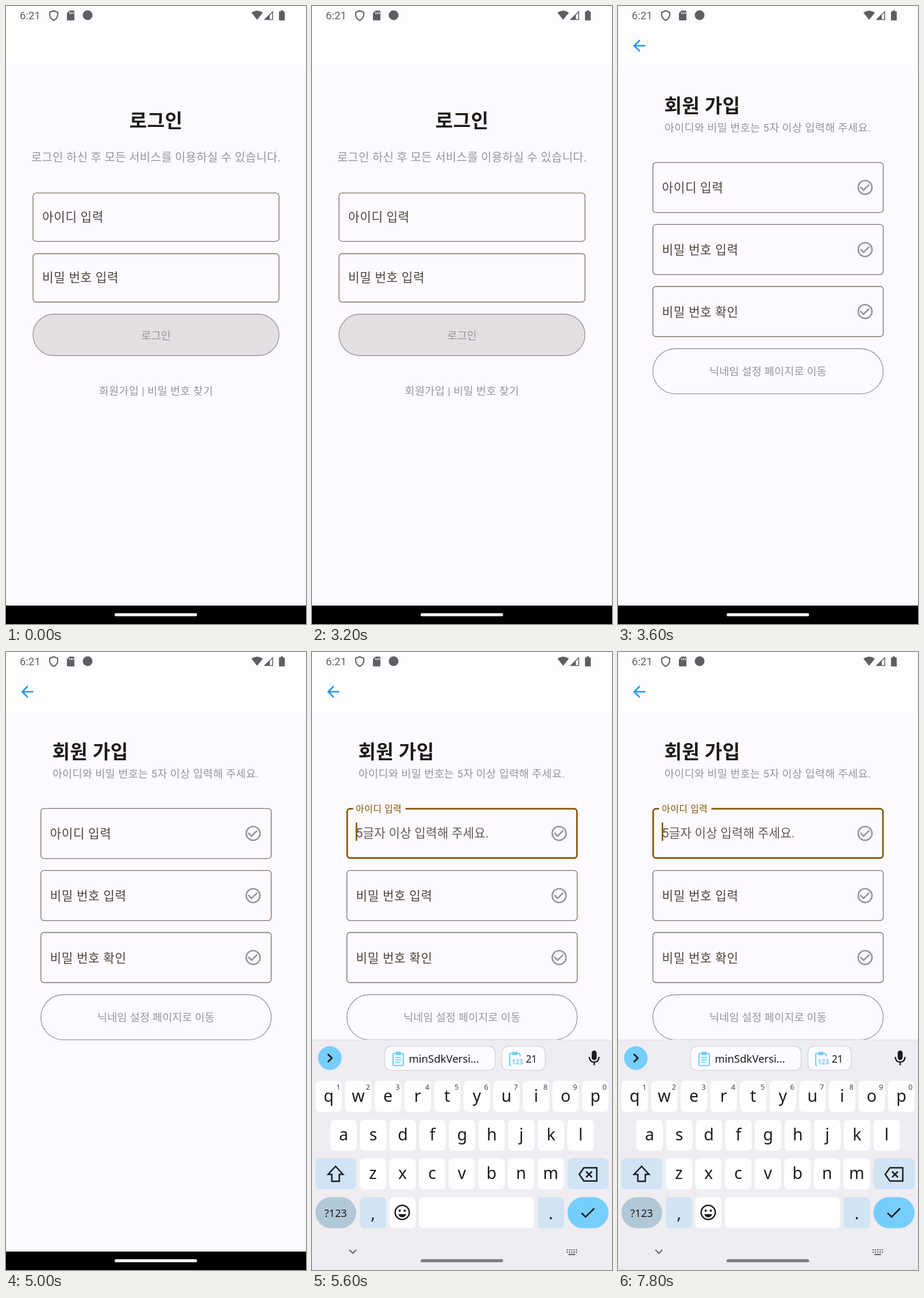
Recreate the animation shown at these times as an HTML page. Size 522x1073 px, loop 8000 ms.

```html
<!DOCTYPE html>
<html lang="ko">
<meta charset="utf-8">
<style>
  html, body { margin: 0; height: 100%; overflow: hidden; background: #fcfaff; }
  svg { display: block; width: 522px; height: 1073px; }
  text { font-family: Roboto, "Noto Sans CJK KR", "Noto Sans CJK JP", sans-serif; white-space: pre; }
  .key { font-family: "Noto Sans", sans-serif; }
</style>
<svg id="stage" viewBox="0 0 522 1073"></svg>
<script>
const INK = '#1e1b16', GRAY = '#989599', LABEL = '#4c4239', LINE = '#7c7168', BROWN = '#835100';
const STATUS = '#5f5e63', SKY = '#76ceff', PALE = '#d0e4f3', WHITE = '#fefdff';
const LOOP = 8000, STEP = 200, SIGNUP_AT = 3600, FOCUS_AT = 5400;

const text = (s, x, y, size, fill, { ls = 0, anchor = 'start', weight = 400, cls = '' } = {}) =>
  `<text x="${x}" y="${y}" font-size="${size}" fill="${fill}" letter-spacing="${ls}" text-anchor="${anchor}" font-weight="${weight}" class="${cls}">${s}</text>`;
const rect = (x, y, w, h, r, fill, stroke = 'none', sw = 1.33) =>
  `<rect x="${x}" y="${y}" width="${w}" height="${h}" rx="${r}" fill="${fill}" stroke="${stroke}" stroke-width="${sw}"/>`;
const circle = (x, y, r, fill, stroke = 'none', sw = 2) =>
  `<circle cx="${x}" cy="${y}" r="${r}" fill="${fill}" stroke="${stroke}" stroke-width="${sw}"/>`;
const shape = (d, fill) => `<path d="${d}" fill="${fill}"/>`;
const line = (d, stroke, sw = 2.4) => `<path d="${d}" fill="none" stroke="${stroke}" stroke-width="${sw}"/>`;
const at = (x, y, body, scale = 1) => `<g transform="translate(${x} ${y}) scale(${scale})">${body}</g>`;
const group = (id, body) => `<g id="${id}">${body}</g>`;
const mid = { anchor: 'middle' };

function statusBar() {
  return rect(0, 0, 522, 105, 0, '#fefcff') +
    text('6:21', 24, 23, 18.6, STATUS) +
    line('M83 8.2L90 11V16Q89 22 83 25Q77 22 76 16V11Z', STATUS, 2) +
    shape('M110.500 8H117.500Q119 8 119 9.500V23.500Q119 25 117.500 25H107.500Q106 25 106 23.500V12.500Z', STATUS) +
    line('M111 10.500V14M114 10.500V14M117 10.500V14', WHITE, 1.4) +
    circle(142, 16, 8.5, STATUS) +
    shape('M427 11.500Q437 4.500 447 11.500L437 24Z', STATUS) +
    line('M464 10V23.500H450.500Z', STATUS, 1.5) +
    shape('M449 24L459 14V24Z', STATUS) +
    shape('M475 9.500H478V7.500H482V9.500H485V25H475Z', STATUS);
}

function loginPage() {
  const field = (s, y) => rect(47, y, 428, 84, 5.3, 'none', LINE) + text(s, 63, y + 49.3, 21.27, LABEL, { ls: .66 });
  return text('로그인', 261, 211, 33.2, INK, { ...mid, weight: 700, ls: .33 }) +
    text('로그인 하신 후 모든 서비스를 이용하실 수 있습니다.', 261, 269.5, 19.94, GRAY, { ...mid, ls: .33 }) +
    field('아이디 입력', 324.7) + field('비밀 번호 입력', 430) +
    rect(47, 535, 428, 72, 36, '#e3dee2', '#98959a') +
    text('로그인', 261, 579, 18.6, GRAY, { ...mid, ls: .13 }) +
    text('회원가입 | 비밀 번호 찾기', 261, 675, 18.6, GRAY, { ...mid, ls: .33 });
}

function signupPage() {
  const check = y => at(414, y - 16, circle(12, 12, 9, 'none', GRAY) +
    shape('M16.590 7.580L10 14.170l-3.590-3.580L5 12l5 5 8-8z', GRAY), 1.33);
  const box = y => rect(60.7, y, 400.8, 87, 5.3, 'none', LINE);
  const label = (s, y) => text(s, 76.5, y, 21.27, LABEL, { ls: .66 });
  return at(21, 53, shape('M20 11H7.830l5.590-5.590L12 4l-8 8 8 8 1.410-1.410L7.830 13H20z', '#2595ea'), 1.33) +
    text('회원 가입', 80.5, 184.5, 33.2, INK, { weight: 700, ls: .33 }) +
    text('아이디와 비밀 번호는 5자 이상 입력해 주세요.', 80.7, 218, 18.6, GRAY, { ls: .33 }) +
    group('idle', box(271.7) + label('아이디 입력', 322.7)) +
    group('focus', rect(61.2, 272.2, 399.8, 85.5, 5, 'none', BROWN, 2.66) +
      rect(71.5, 268, 91, 8, 0, '#fcfaff') +
      text('아이디 입력', 76, 278, 15.95, BROWN, { ls: .5 }) +
      text('5글자 이상 입력해 주세요.', 76.5, 321.5, 21.27, '#625b57', { ls: .15 }) +
      group('cursor', rect(76, 296, 2.6, 32, 1.3, BROWN))) +
    box(379.3) + label('비밀 번호 입력', 430.7) +
    box(487) + label('비밀 번호 확인', 538.5) +
    [315, 423, 530.5].map(check).join('') +
    rect(60.7, 595, 400.8, 78.3, 39.1, 'none', '#98959a') +
    text('닉네임 설정 페이지로 이동', 261, 641, 18.6, GRAY, { ...mid, ls: .13 });
}

function keyboard() {
  const dark = '#1a1c1e', pitch = 51.55;
  const cap = (x, y, w, fill = WHITE, r = 7.5) => rect(x, y, w, 54, r, fill);
  const glyph = (s, x, y) => text(s, x, y, 28.5, dark, { ...mid, cls: 'key' });
  const row = (letters, x, y) => [...letters].map((c, i) =>
    cap(x + i * pitch, y, 46) + glyph(c, x + 23 + i * pitch, y + 36)).join('');
  const hints = [...'1234567890'].map((c, i) =>
    text(c, 46 + i * 51.45, 759.5, 13, '#44474a', { ...mid, cls: 'key' })).join('');
  const clipboard = x => rect(x, 697, 18, 21, 2, 'none', SKY, 2.2) + rect(x + 4, 694, 10, 6, 2, SKY);
  const word = (s, x, y, size) => text(s, x, y, size, dark, { weight: 500, cls: 'key' });

  const toolbar = circle(31, 705, 20.5, SKY) + line('M27.500 698L34.500 705L27.500 712', dark, 2.8) +
    rect(126.5, 684.7, 192, 41.5, 10.5, '#fcfbff', '#d5d4d9') + rect(330.5, 684.7, 75.3, 41.5, 10.5, '#fcfbff', '#d5d4d9') +
    clipboard(141) + line('M145 704H155M145 708H155M145 712H152', SKY, 2) +
    word('minSdkVersi...', 168.500, 712.5, 18.5) +
    clipboard(344) + rect(347, 702, 20, 17, 0, '#fcfbff') +
    text('123', 347.5, 716, 11.5, SKY, { weight: 700, cls: 'key' }) +
    word('21', 372, 712.5, 17.2) +
    rect(486.7, 692, 8.6, 16.5, 4.3, dark) + line('M482.500 703Q483 712 491 712Q499 712 499.500 703M491 712V717.500', dark);

  const bottom = cap(6, 946.5, 71, '#b3c8d7', 27) + word('?123', 21.5, 980.5, 18.3) +
    cap(83, 946.5, 46, PALE) + glyph(',', 106, 984.5) +
    cap(134.5, 946.5, 46) + circle(157, 973, 12.3, 'none', dark, 2.5) +
    circle(152.6, 970, 2, dark) + circle(161.4, 970, 2, dark) + shape('M150 976H164Q162 981.500 157 981.500T150 976Z', dark) +
    cap(186, 946.5, 200.5) + cap(392.5, 946.5, 46, PALE) + glyph('.', 415.5, 984.5) +
    cap(444.5, 946.5, 71.5, SKY, 27) + line('M469 974L476 981L491 966', dark, 2.6);

  let dots = '';
  for (let y = 1037; y <= 1042; y += 4)
    for (let x = 443; x <= 462; x += 4) dots += rect(x, y, 2.2, 2.2, 0, '#66666b');

  return rect(0, 673.5, 522, 440, 0, '#efedf1') + rect(0, 673, 522, 1.5, 0, '#e5e3e8') + toolbar +
    row('qwertyuiop', 6, 744.5) + hints + row('asdfghjkl', 32, 812) +
    cap(6, 879, 71, PALE) + line('M41 893L54 907H47.500V919H34.500V907H28Z', dark, 2.5) +
    row('zxcvbnm', 83, 879) +
    cap(444.5, 879, 71.5, PALE) + line('M473 895.500H495.500V918.500H473L465 907Z', dark, 2.5) +
    line('M477 902L487 912M487 902L477 912', dark, 2.5) + bottom +
    line('M65 1038L71 1044L77 1038', '#66666b', 2) + dots + rect(446, 1045, 12, 2.2, 0, '#66666b');
}

const stage = document.getElementById('stage');
stage.innerHTML = rect(0, 0, 522, 1073, 0, '#fcfaff') + statusBar() +
  group('login', loginPage()) + group('signup', signupPage()) +
  group('nav', rect(0, 1041, 522, 32, 0, '#000') + rect(189, 1054.3, 143.5, 5.3, 2.65, '#f8f7f8')) +
  group('keys', keyboard()) + group('pill', rect(189, 1054.3, 143.5, 5.3, 2.65, '#7c7b80'));

const show = (id, on) => document.getElementById(id).setAttribute('visibility', on ? 'inherit' : 'hidden');

function draw(now) {
  const t = Math.floor(now % LOOP / STEP) * STEP;
  const signup = t >= SIGNUP_AT, focused = t >= FOCUS_AT, settled = t >= FOCUS_AT + STEP;
  show('login', !signup);
  show('signup', signup);
  show('idle', !focused);
  show('focus', focused);
  show('cursor', focused && t % 1000 >= 500);
  show('nav', !focused);
  show('keys', focused);
  show('pill', settled);
  document.getElementById('keys').setAttribute('transform', `translate(0 ${settled ? 0 : 31})`);
  requestAnimationFrame(() => draw(performance.now()));
}
draw(0);
</script>
</html>
```
